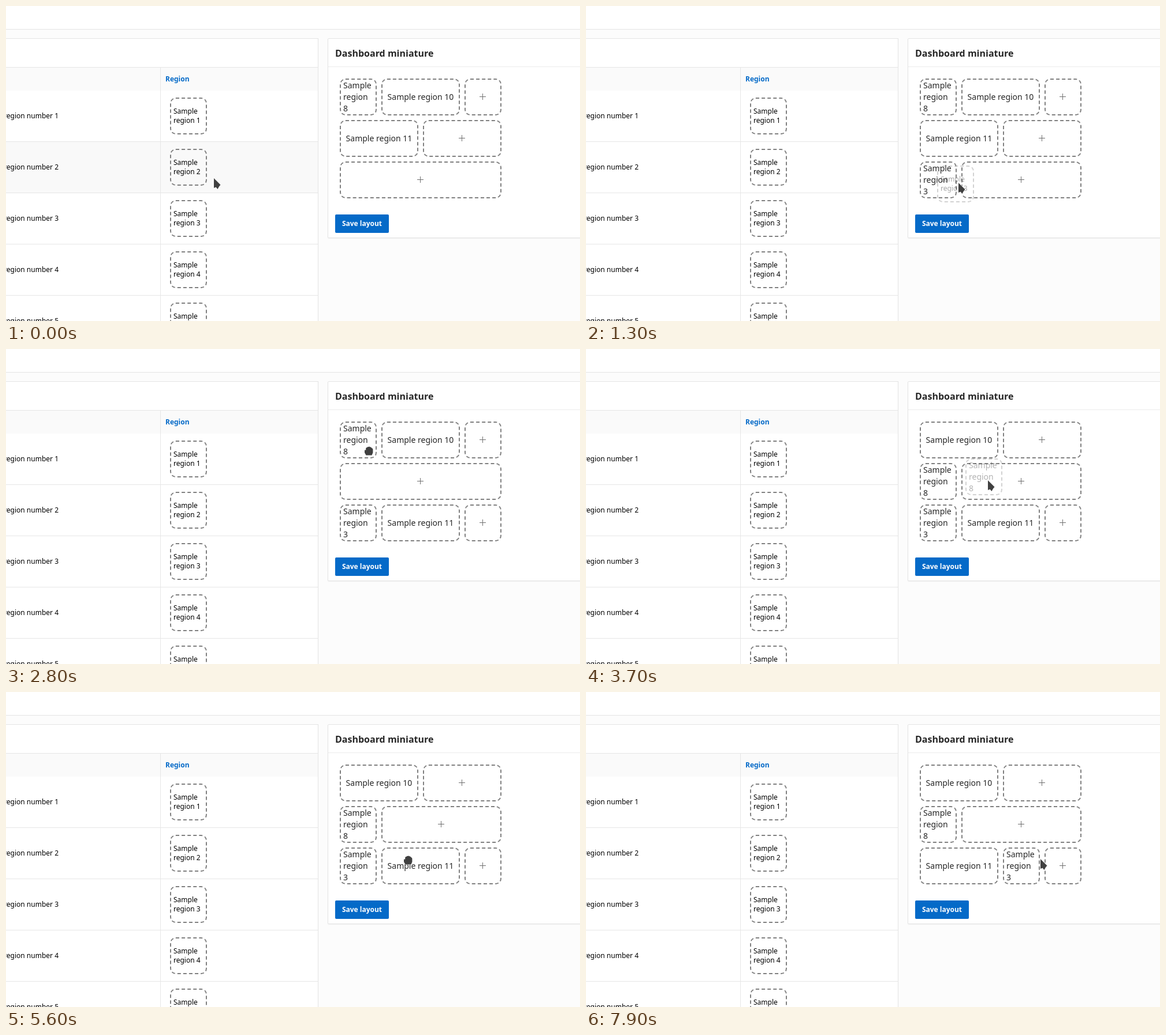
An HTML page for the animation above (8300 ms loop, 994x547 px).

```html
<!DOCTYPE html>
<html lang="en">
<head>
<meta charset="utf-8">
<title>Dashboard miniature</title>
<style>
  html, body { margin: 0; width: 100%; height: 100%; overflow: hidden; }
  body { background: #fcfcfc; }
  #stage {
    position: relative; width: 994px; height: 547px; overflow: hidden;
    font: 12px/16px "Noto Sans", sans-serif; color: #000; background: #fcfcfc;
  }
  #stage div, #stage svg { position: absolute; box-sizing: border-box; }
  .bar { left: 0; top: 0; width: 994px; height: 41px; background: #fff; border-bottom: 1px solid #e4e4e4; }
  .card { top: 56px; background: #fff; border: 1px solid #e4e4e4; }
  .list { left: -10px; width: 551px; height: 520px; }
  .mini { left: 557px; width: 460px; height: 347px; border-radius: 2px; box-shadow: 0 1px 2px rgba(0, 0, 0, .06); }
  .head { left: 0; top: 106px; width: 540px; height: 41px; background: #fafafa; border-top: 1px solid #e6e6e6; }
  .row { left: 0; width: 540px; height: 89px; border-bottom: 1px solid #e6e6e6; }
  .row.hover { background: #f9f9f9; }
  .name { right: 449px; top: 36px; white-space: nowrap; }
  .split { left: 267px; top: 107px; width: 1px; height: 440px; background: #e6e6e6; }
  .th { left: 276px; top: 119px; font-weight: 700; color: #056ac8; }
  .title { left: 570px; top: 70px; font: 700 16px/24px "Noto Sans", sans-serif; color: #262626; white-space: nowrap; }
  .rule { left: 558px; top: 105px; width: 436px; height: 1px; background: #ececec; }
  .save {
    left: 570px; top: 362px; width: 93px; height: 32px; border-radius: 2px; background: #056ac8;
    color: #fff; font-weight: 700; line-height: 32px; text-align: center;
  }
  .cell {
    height: 64px; border: 2px dashed #808080; border-radius: 10px; padding: 0 4px;
    display: flex; align-items: center; white-space: nowrap;
  }
  .big { font-size: 14px; line-height: 20px; color: #262626; }
  .wide { justify-content: center; }
  .ghost { opacity: .35; }
  .plus::before, .plus::after { content: ""; position: absolute; background: #707070; }
  .plus::before { left: calc(50% - 6px); top: 29px; width: 11px; height: 1px; }
  .plus::after { left: calc(50% - 1px); top: 24px; width: 1px; height: 11px; }
  #stage svg { left: 0; top: 0; overflow: visible; }
</style>
</head>
<body>
<div id="stage">
  <div class="bar"></div>
  <div class="card list"></div>
  <div class="head"></div>
  <div id="rows"></div>
  <div class="split"></div>
  <div class="th">Region</div>
  <div class="card mini"></div>
  <div class="title">Dashboard miniature</div>
  <div class="rule"></div>
  <div class="save">Save layout</div>
  <div id="grid"></div>
  <div id="drag"></div>
  <svg width="1" height="1" stroke-linejoin="round">
    <path id="arrow" d="M0 0V17L3.5 15.5L6.5 19L9 14.5L11.5 11.5Z"
      fill="#404040" stroke="#fff" stroke-width="1.6" paint-order="stroke"/>
    <path id="hand" d="M-4.5 7.5L-7 3V-1.5H-4.8V-4.5Q-4.4 -6.5 -2.6 -6Q-1.6 -8 0 -7Q1.8 -8 3 -6.4Q5 -6.8 5.4 -4.8Q7.4 -4.8 7.4 -2.4V3L5.5 7.5Z"
      fill="#404040" stroke="#fff" paint-order="stroke"/>
  </svg>
</div>
<script>
const LOOP = 8300, STEP = 100;
const UNIT = 72, GAP = 8, COLUMNS = 4;
const MINI = { x: 578, y: 126 };
const LIST = { x: 284, y: 147, rowHeight: 89, width: 540 };
const REST = [360, 299], FINISH = [787, 290];

// Each drag picks a region up at grab, reaches end at land and lets go at drop.
const drags = [
  { region: 3, pick: 500, land: 1100, drop: 1400, grab: [321, 367], end: [645, 307] },
  { region: 11, pick: 1800, land: 2300, drop: 2500, grab: [640, 234], end: [721, 289] },
  { region: 8, pick: 3000, land: 3700, drop: 3900, grab: [617, 164], end: [696, 228] },
  { region: 3, pick: 4800, land: 5200, drop: 5600, grab: [608, 296], end: [696, 292] },
  { region: 3, pick: 6700, land: 7100, drop: 7400, grab: [612, 294], end: [828, 292] }
];

const $ = id => document.getElementById(id);
const clamp = k => Math.min(1, Math.max(0, k));
const easeOut = k => 1 - (1 - clamp(k)) ** 2.5;
const smooth = k => clamp(k) ** 2 * (3 - 2 * clamp(k));
const mix = (a, b, k) => a.map((v, i) => Math.round(v + (b[i] - v) * k));

const span = n => n >= 10 ? 2 : 1;
const used = regions => regions.reduce((sum, n) => sum + span(n), 0);
const width = units => units * UNIT - GAP;
const plusLeft = regions => MINI.x + used(regions) * UNIT;
const listCell = n => ({ n, x: LIST.x, y: LIST.y + 12 + (n - 1) * LIST.rowHeight, w: width(1), small: true });

function pointer(t) {
  let from = REST, left = 0;
  for (const { pick, land, drop, grab, end } of drags) {
    if (t < pick) return mix(from, grab, easeOut((t - left) / (pick - left)));
    if (t < drop) return mix(grab, end, smooth((t - pick) / (land - pick)));
    from = end;
    left = drop;
  }
  return mix(from, FINISH, easeOut((t - left) / 500));
}

function miniCells(rows) {
  return rows.flatMap((regions, r) => regions.map((n, i) => ({
    n, x: plusLeft(regions.slice(0, i)), y: MINI.y + r * UNIT, w: width(span(n))
  })));
}

// Empty rows accept a region on hover, others on drop; a drop on another region goes back.
function sceneAt(t) {
  const rows = [[8, 10], [11], []];
  let ghost;
  for (const { region, pick, drop, grab } of drags) {
    if (t <= pick) break;
    const dropped = t >= drop;
    const [x, y] = pointer(Math.min(t, drop));
    const source = miniCells(rows).find(c => c.n === region) || listCell(region);
    const home = rows.findIndex(r => r.includes(region));
    const before = rows[home];
    if (before) rows[home] = before.filter(n => n !== region);

    const over = Math.floor((y - MINI.y) / UNIT);
    const target = rows[over];
    const accepts = target && x >= plusLeft(target) && (dropped || (!target.length && over !== home));
    if (accepts) target.push(region);
    else if (dropped && before) rows[home] = before;

    if (!dropped) ghost = { ...source, x: x - grab[0] + source.x, y: y - grab[1] + source.y };
  }
  return { rows, ghost };
}

function box(x, y, w, kind, text = "") {
  return `<div class="cell ${kind}" style="left:${x}px;top:${y}px;width:${w}px">${text}</div>`;
}

function regionBox({ n, x, y, w, small }, kind = "") {
  if (small) return box(x, y, w, kind, `Sample<br>region ${n}`);
  return span(n) > 1
    ? box(x, y, w, "big wide " + kind, `Sample region ${n}`)
    : box(x, y, w, "big " + kind, `Sample<br>region<br>${n}`);
}

function plusBox(regions, r) {
  return box(plusLeft(regions), MINI.y + r * UNIT, width(COLUMNS - used(regions)), "plus");
}

const listCells = [1, 2, 3, 4, 5].map(listCell);
$("rows").innerHTML = listCells.map(c =>
  `<div class="row" style="top:${c.y - 12}px"><div class="name">region number ${c.n}</div>` +
  regionBox({ ...c, y: 12 }) + "</div>").join("");
const listRows = [...$("rows").children];

function draw(t) {
  const [x, y] = pointer(t);
  const { rows, ghost } = sceneAt(t);
  const cells = miniCells(rows);
  $("grid").innerHTML = cells.map(c => regionBox(c)).join("") + rows.map(plusBox).join("");
  $("drag").innerHTML = ghost ? regionBox(ghost, "ghost") : "";

  const hovered = !ghost && x < LIST.width ? Math.floor((y - LIST.y) / LIST.rowHeight) : -1;
  listRows.forEach((row, i) => row.classList.toggle("hover", i === hovered));

  const onRegion = [...listCells, ...cells].some(c => x >= c.x && x < c.x + c.w && y >= c.y && y < c.y + 64);
  const shown = onRegion && !ghost ? "hand" : "arrow";
  for (const id of ["arrow", "hand"]) {
    $(id).setAttribute("transform", `translate(${x} ${y})`);
    $(id).style.display = id === shown ? "" : "none";
  }
}

const start = performance.now();
let lastStep = -1;

function tick() {
  const step = Math.floor((performance.now() - start) % LOOP / STEP);
  if (step !== lastStep) {
    lastStep = step;
    draw(step * STEP);
  }
  requestAnimationFrame(tick);
}
tick();
</script>
</body>
</html>
```
